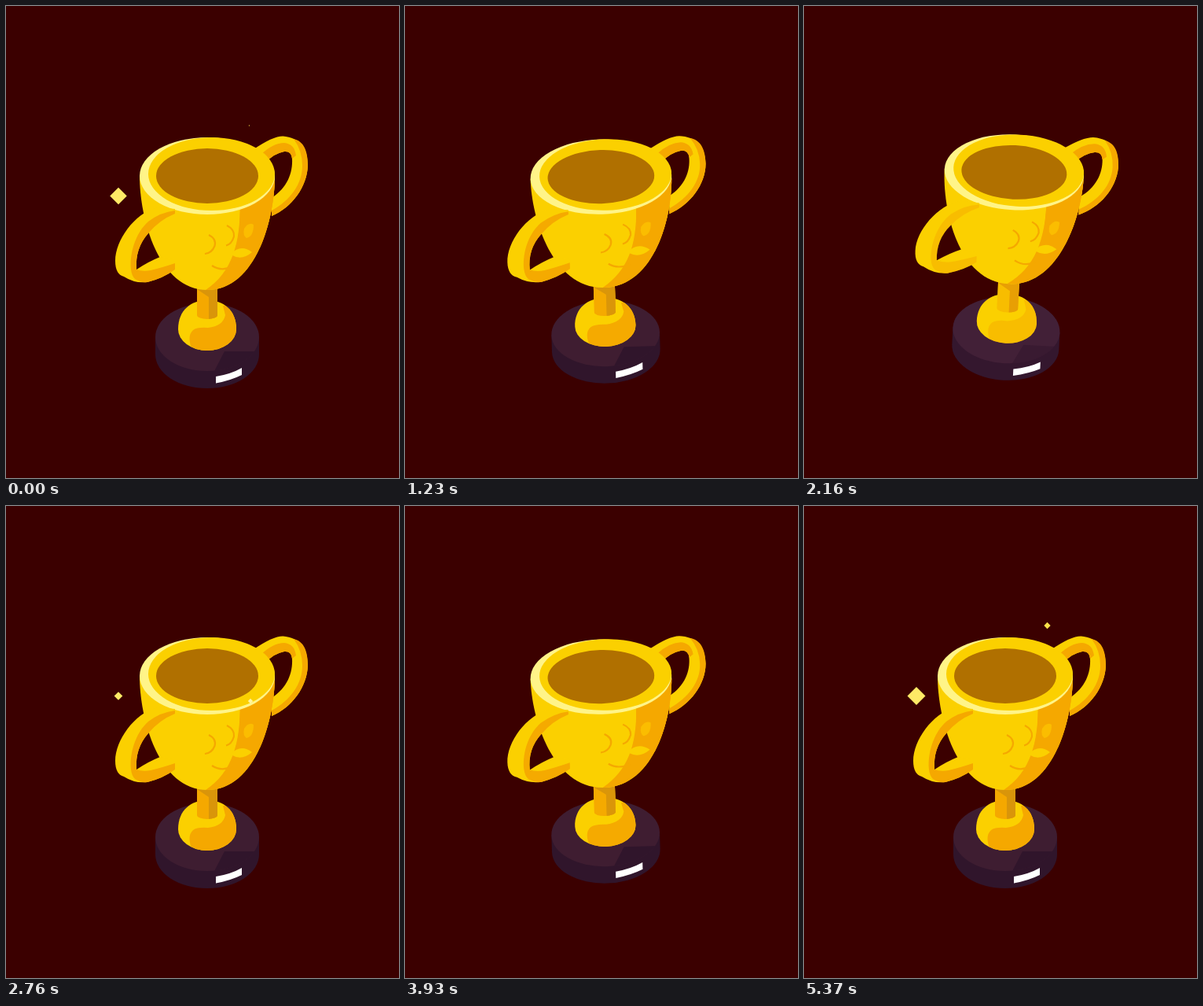
An HTML page with a canvas that plays this animation: 500x600 px, repeating every 5.4 s.

```html
<!DOCTYPE html>
<html lang="en">
<head>
<meta charset="utf-8">
<title>Trophy</title>
<style>
html, body { margin: 0; height: 100%; overflow: hidden; background: #3b0000; }
canvas { display: block; }
</style>
</head>
<body>
<canvas id="stage" width="500" height="600"></canvas>
<script>
const ctx = document.getElementById('stage').getContext('2d');
const LOOP = 2700, HOP = 950, FIRST_HOP = 300, REST = FIRST_HOP + 2 * HOP;
const TWINKLE = 900, SPARK_LIFE = 260;
const SQUASH = -.036;
const GOLD = '#fbd000', AMBER = '#f5a800', PALE = '#fff488';

const clamp = v => Math.max(0, Math.min(1, v));
const smooth = v => { v = clamp(v); return v * v * (3 - 2 * v); };
const backOut = v => { v = clamp(v) - 1; return 1 + 2.7 * v ** 3 + 1.7 * v ** 2; };

// Anticipation, a hop to the left, a hop to the right, then a damped wobble
function poseAt(t) {
  if (t < FIRST_HOP) return { air: 0, tilt: 0, stretch: SQUASH * smooth((t - 100) / 200) };
  if (t >= REST) {
    const p = clamp((t - REST) / 400);
    return { air: 0, tilt: 0, stretch: SQUASH * (1 - p) * Math.cos(3 * Math.PI * p) };
  }
  const side = t < FIRST_HOP + HOP ? -1 : 1;
  const p = (t - FIRST_HOP) % HOP / HOP;
  const rise = backOut(p / .63), fall = clamp((p - .63) / .37);
  const air = rise * (1 - fall ** 3);
  return { air, tilt: side * 4.65 * rise * (1 - fall ** 8), stretch: SQUASH + .055 * air };
}

const oval = (x, y, rx, ry) =>
  `M${x - rx} ${y}a${rx} ${ry} 0 0 1 ${2 * rx} 0a${rx} ${ry} 0 0 1 ${-2 * rx} 0Z`;

function fill(path, color, alpha = 1) {
  ctx.globalAlpha = alpha;
  ctx.fillStyle = color;
  ctx.fill(new Path2D(path));
}

function fillInside(mask, path, color, alpha) {
  ctx.save();
  ctx.clip(new Path2D(mask));
  fill(path, color, alpha);
  ctx.restore();
}

function line(path, alpha) {
  ctx.globalAlpha = alpha;
  ctx.strokeStyle = AMBER;
  ctx.lineWidth = 2.2;
  ctx.stroke(new Path2D(path));
}

function drawRightHandle() {
  fill('M314 183Q343 163 356 166C377 169 384 184 384 203C383 230 364 256 338 267V244C358 231 365 212 364 194Q363 184 354 185Q342 187 330 199Z', GOLD);
  fill('M324 189Q340 174 354 174Q367 175 369 190L364 194Q363 184 354 185Q342 187 330 199Z', AMBER);
  fill('M366 169C379 172 384 184 384 203C383 230 364 256 338 267V260C362 247 377 226 377 203Q377 184 366 169Z', AMBER);
}

function drawBase(still) {
  const top = oval(256, 421, 66, 43);
  const side = 'M190 421V443A66 43 0 0 0 322 443V421Z';
  const glow = 1 - still;
  fill(side, '#30152b');
  fill(side, '#3b1c37', glow * .6);
  fill(top, '#3e1d31');
  fill(top, '#46233f', glow * .8);
  fillInside(top, 'M278 439H330V470H262Z', '#30152b', still);
  fill('M267 471Q286 468 300 460V469Q286 476 267 479.5Z', '#fff');
}

function drawStem(still) {
  const bulb = 'M219 411C219 386 236 374 256 374S293 386 293 411A37 27 0 0 1 219 411Z';
  fill(bulb, GOLD);
  fillInside(bulb, 'M238 440Q229 420 238 412Q243 408 257 409Q276 407 279 393L276 381H300V440Z', AMBER, still);
  const stem = 'M243 352H269V393A13 5 0 0 1 243 393Z';
  fill(stem, GOLD);
  fill(stem, AMBER, still);
  const shade = 'M243 360H270V400H258V370Z';
  fillInside(stem, shade, AMBER);
  fillInside(stem, shade, '#d9950a', still);
}

function drawCup(facing) {
  const body = 'M170 216C170 270 194 361 256 361S342 270 342 216Z';
  const inside = oval(256, 216, 65, 35);
  const away = 1 - facing;
  fill(body, GOLD);
  fillInside(body, 'M298 250C298 302 288 338 254 361H350V216Z', AMBER, facing);
  fillInside(body, 'M298 250L297 281L330 314H350V216Z', AMBER);
  line('M258 291Q268 296 265.5 305Q262 314 253 315M281 279Q291 284 290 293Q287 303 280 304.5', facing);
  line('M262 330Q274 338 288 331', facing);
  fill('M303 283Q309 274 315 278Q315 293 306 295Q301 292 303 283Z', '#fbbd00');
  fill('M286 315Q299 302 313 313Q300 324 288 317Z', GOLD, facing);
  line('M289 318Q301 323 314 313', away);

  fill(oval(256, 216, 86, 49), PALE);
  fill(oval(261.5, 213.5, 80.5, 46.5), GOLD);
  fill(inside, '#b07000');
  fillInside(inside, 'M213 190L272 252H180V190Z', AMBER, away);
  fillInside(inside, 'M232 250L266 245L272 253H232Z', '#d38c04', away);
}

function drawLeftHandle(still) {
  fill('M192 256C163 264 139 298 139 324Q139 341 150 344Q164 353 180 351Q200 346 215 335V322L196 319Q181 325 166 335Q164 308 181 289Q195 270 215 264V258Z', GOLD);
  fill('M215 260Q197 262 181 274C164 289 157 316 159 335Q160 343 164 347Q172 352 180 351Q200 346 215 335V327Q197 333 184 336Q174 338 166 335Q164 308 181 289Q195 272 215 264Z', AMBER, still);
}

function drawTrophy(t) {
  const { air, tilt, stretch } = poseAt(t);
  const still = clamp(1.6 - Math.abs(tilt) * .4);
  ctx.save();
  ctx.translate(256 + tilt * .5, 421 - 30 * air);
  ctx.rotate(tilt * Math.PI / 180);
  ctx.scale(1 - 1.6 * stretch, 1 + stretch);
  ctx.translate(-256, -421);
  drawRightHandle();
  drawBase(still);
  drawStem(still);
  drawCup(clamp(2.7 - tilt * .6));
  drawLeftHandle(still);
  ctx.restore();
}

// Diamonds light up one after another; r is the largest half diagonal
const sparks = [
  { x: 250, y: 333, r: 8, slot: 0, color: '#fff3a0' },
  { x: 309.5, y: 152, r: 11, slot: 1, color: '#fbe14a' },
  { x: 143, y: 241.5, r: 11.5, slot: 2, color: '#fdea66' },
  { x: 311, y: 248, r: 11, slot: 4, color: '#fff3a0' }
];

function drawSparks(t) {
  for (const { x, y, r, slot, color } of sparks) {
    const age = (t + TWINKLE - 545 - 98 * slot) % TWINKLE / SPARK_LIFE;
    if (age < 0 || age >= 1) continue;
    const size = Math.max(.8, r * Math.sin(Math.PI * age));
    fill(`M${x} ${y - size}l${size} ${size}l${-size} ${size}l${-size} ${-size}Z`, color);
  }
}

const origin = performance.now();
function frame() {
  const t = (performance.now() - origin) % LOOP;
  fill('M0 0H500V600H0Z', '#3b0000');
  drawTrophy(t);
  drawSparks(t % TWINKLE + TWINKLE);
  requestAnimationFrame(frame);
}
frame();
</script>
</body>
</html>
```
